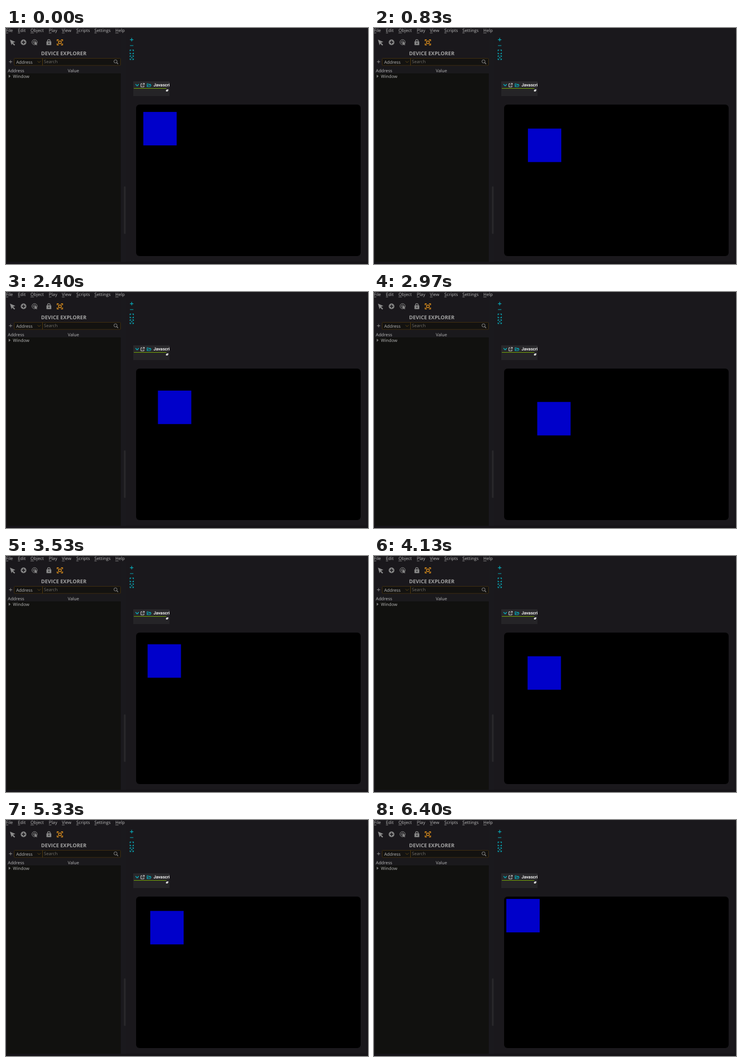
An HTML page that plays this animation: 640x416 px, repeating every 6430 ms.

```html
<!DOCTYPE html>
<html lang="en">
<head>
<meta charset="utf-8">
<title>Device explorer</title>
<style>
  html, body { margin: 0; width: 100%; height: 100%; overflow: hidden; background: #1a181c; }
  svg { display: block; width: 640px; height: 416px; }
  text { font: 7.7px "Open Sans", "Noto Sans", sans-serif; fill: #b9b9b9; text-rendering: geometricPrecision; white-space: pre; }
  .title { font-size: 9.1px; font-weight: 700; fill: #a3a3a3; }
  .dim { fill: #74726c; }
  .node { font: 700 7.6px Roboto, "Open Sans", sans-serif; fill: #ececec; }
  .line { fill: none; stroke-width: 1; }
  .gray { stroke: #858585; }
  .cyan { stroke: #08a9b8; }
</style>
</head>
<body>
<svg viewBox="0 0 640 416">
  <defs>
    <clipPath id="screen"><rect x="230" y="135" width="397" height="267" rx="6"/></clipPath>
    <clipPath id="box"><rect x="225" y="94" width="64" height="26"/></clipPath>
  </defs>

  <rect width="640" height="416" fill="#1a181c"/>
  <rect y="411.5" width="640" height="4.5" fill="#161418"/>
  <rect x="637" y="10" width="3" height="402" fill="#171519"/>
  <g id="menu"></g>

  <!-- Toolbar -->
  <path d="M7 20.5l9.5 4-4 1.5 3.6 3.6-1.5 1.5-3.6-3.7-1.2 3z" fill="#8c8c8c"/>
  <circle cx="31" cy="25.3" r="5" fill="#858585"/>
  <path class="line" stroke="#1a181c" d="M28 25.3h6M31 22.3v6" style="stroke-width:1.6"/>
  <circle class="line gray" cx="50.5" cy="25" r="4.6"/>
  <circle class="line gray" cx="50.5" cy="25" r="2.2"/>
  <path d="M50 24.2l5.5 2.4-2.2.8 2 2.2-1.1 1-2-2.1-.9 1.7z" fill="#8c8c8c"/>
  <path class="line gray" d="M73.5 24v-1.4a2.3 2.3 0 0 1 4.6 0v1.4" style="stroke-width:1.3"/>
  <rect x="71.5" y="23.6" width="8.6" height="6.6" rx=".8" fill="#858585"/>
  <rect x="75" y="25.8" width="1.7" height="2" fill="#1a181c"/>
  <g class="line" stroke="#d58a1c" style="stroke-width:1.4">
    <path d="M90.5 23.3v-2.5h2.8M97.2 20.8h2.8v2.5M100 27.3v2.5h-2.8M93.3 29.8h-2.8v-2.5"/>
    <rect x="93" y="23.2" width="4.6" height="4.2"/>
  </g>

  <!-- Explorer panel -->
  <text class="title" x="62" y="47.8">DEVICE EXPLORER</text>
  <path class="line gray" d="M5.3 59.5h5.6M8.1 56.7v5.6"/>
  <rect x="14.5" y="53.5" width="188" height="12.5" rx="1" fill="#131210" stroke="#3d2d10"/>
  <path class="line" stroke="#4f3910" d="M64.5 53.5V66"/>
  <text x="18" y="62.7">Address</text>
  <path class="line" stroke="#5f4718" d="M55.8 58.3l2.7 2.8 2.7-2.8"/>
  <text class="dim" x="67" y="62.4">Search</text>
  <circle class="line gray" cx="193.6" cy="58.9" r="2.8"/>
  <path class="line gray" d="M195.7 61l2.5 2.5" style="stroke-width:1.3"/>
  <rect x="1.5" y="69" width="201.5" height="343" fill="#11110f"/>
  <rect x="1.5" y="69" width="201.5" height="11" fill="#1a191c"/>
  <text x="3.3" y="77.5">Address</text>
  <text x="109.3" y="77.5">Value</text>
  <path d="M4.8 82.3l3.4 2.7-3.4 2.7z" fill="#777"/>
  <text x="12.3" y="87.5">Window</text>
  <rect x="203" y="10" width="10" height="402" fill="#1a191d"/>
  <rect x="208.5" y="279" width="3" height="84" rx="1.5" fill="#29282b"/>

  <!-- View controls -->
  <g class="line cyan" style="stroke-width:1.2">
    <path d="M219.2 20.6h6M222.2 17.6v6M219.2 31h6"/>
    <path id="corners" d="M219.3 40.8v-2h2M223.4 38.8h2v2M225.4 43.4v2h-2M221.3 45.4h-2v-2"/>
    <use href="#corners" y="10.3"/>
    <path d="M221 51l2.8 2.8M223.8 51l-2.8 2.8" style="stroke-width:1"/>
  </g>

  <!-- Process box -->
  <g clip-path="url(#box)">
    <rect x="225" y="94" width="64" height="26" fill="#252427"/>
    <rect x="225" y="94" width="64" height="12" fill="#29282b"/>
    <path class="line" stroke="#6f9c08" d="M226 106.5h57.5"/>
    <path class="line cyan" d="M229 99l2.9 3 2.9-3" style="stroke-width:1.3"/>
    <path class="line" stroke="#c9c9c9" d="M241 98.2h-2.5v5.6h5.4v-2.6M241.2 101.2l3.2-3.4M242.2 97.6h2.4v2.4"/>
    <path class="line cyan" d="M249.4 103.4v-5.2h2.3l.9 1h3v1.4M249.4 103.4l1.4-2.8h5.7l-1.2 2.8z"/>
    <text class="node" x="260.8" y="103">Javascript</text>
    <rect x="284" y="108" width="3.2" height="2.8" fill="#aaa"/>
    <rect x="282.8" y="109.3" width="3.2" height="2.5" fill="#e4e4e4"/>
  </g>

  <!-- Output window -->
  <g clip-path="url(#screen)">
    <rect x="230" y="135" width="397" height="267"/>
    <rect id="square" width="59" height="59" fill="#0000ca"/>
  </g>
</svg>
<script>
  const NS = "http://www.w3.org/2000/svg";
  const menu = document.getElementById("menu");
  const square = document.getElementById("square");

  function add(tag, attrs, content = "") {
    const el = document.createElementNS(NS, tag);
    for (const [key, value] of Object.entries(attrs)) el.setAttribute(key, value);
    el.textContent = content;
    menu.append(el);
  }

  const items = [
    ["File", 0, 4], ["Edit", 21, 4], ["Object", 43.3, 6], ["Play", 75.8, 4.5],
    ["View", 98.8, 4.8], ["Scripts", 124.3, 4], ["Settings", 156.3, 4], ["Help", 193.3, 5.6],
  ];
  for (const [name, x, width] of items) {
    add("text", { x, y: 7.3 }, name);
    add("rect", { x, y: 8.5, width, height: 0.7, fill: "#a5a5a5" });
  }

  const LOOP = 6430;
  const TICK = 100 / 3;
  const UNIT = 0.588; // pixels per step of the 0-100 ramp

  function draw(now) {
    const tick = Math.floor((now % LOOP + 4) / TICK);
    const skipped = tick >= 105 ? 1 : 0;
    const offset = (21.3 + 2 * tick + skipped) % 100 * UNIT;
    square.setAttribute("x", 230.2 + offset);
    square.setAttribute("y", 135.4 + offset);
  }

  const start = performance.now();
  function loop() {
    draw(performance.now() - start);
    requestAnimationFrame(loop);
  }
  loop();
</script>
</body>
</html>
```
